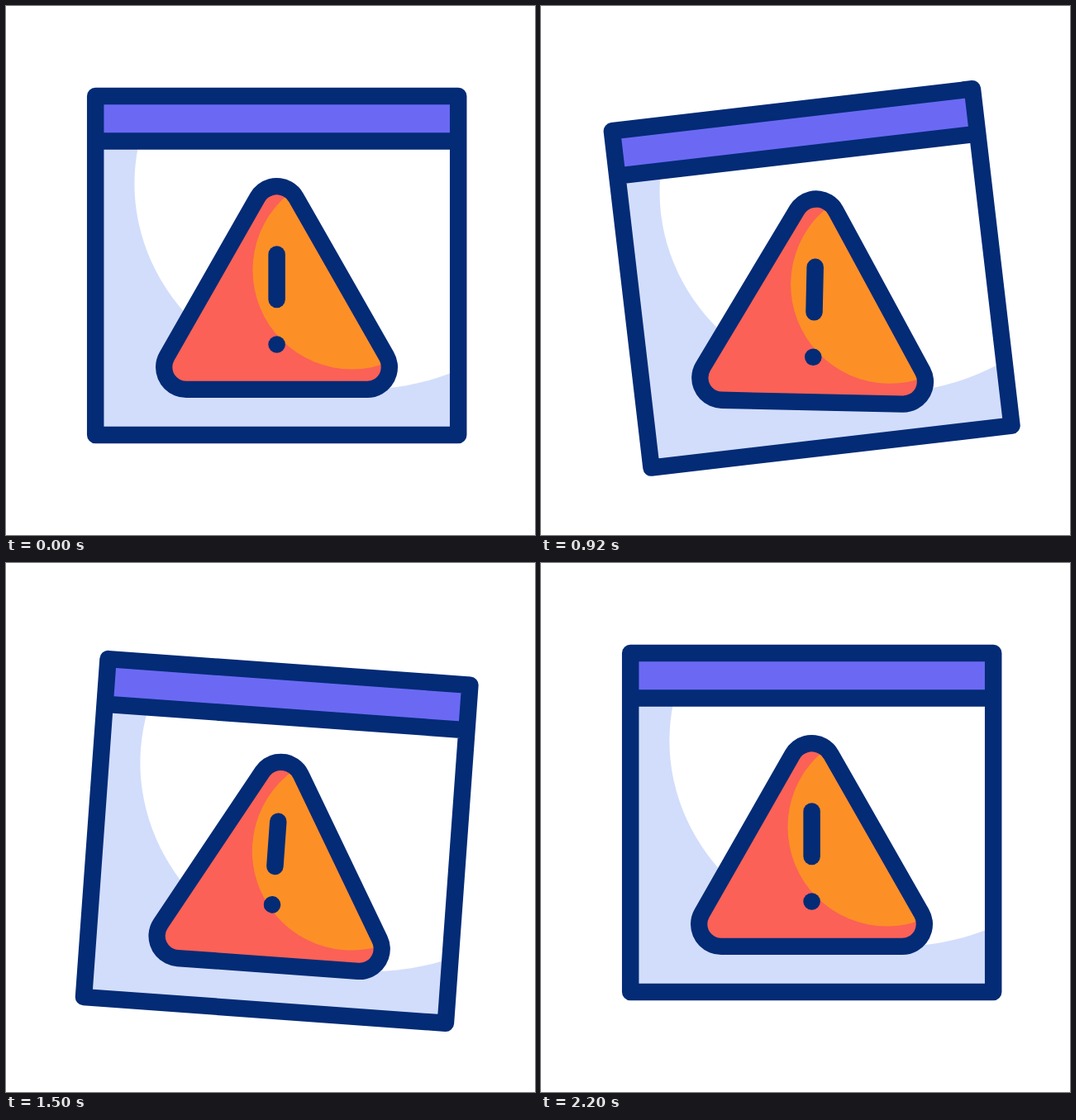
An HTML page that plays this animation: 640x640 px, repeating every 2.4 s.

```html
<!DOCTYPE html>
<html lang="en">
<head>
<meta charset="utf-8">
<title>Warning window</title>
<style>
html, body { margin: 0; height: 100%; overflow: hidden; background: #fff; }
svg { display: block; width: 100vw; height: 100vh; }
</style>
</head>
<body>
<svg viewBox="0 0 640 640">
  <defs>
    <clipPath id="pane"><path d="M108 109H547V519H108Z"/></clipPath>
    <path id="tri" d="M218 437L327.5 245L437 437Z" stroke-linejoin="round"/>
    <mask id="inside"><use href="#tri" fill="#fff" stroke="#fff" stroke-width="33.4"/></mask>
  </defs>
  <g id="win">
    <g clip-path="url(#pane)">
      <path d="M108 109H547V519H108Z" fill="#d2ddfb"/>
      <ellipse cx="430.4" cy="215" rx="275" ry="249" fill="#fff"/>
      <path d="M108 109H547V163H108Z" fill="#6b69f4"/>
    </g>
    <path d="M108.2 108.9H547.2V519H108.2ZM108.2 163.6H547.2" fill="none" stroke="#032b76"
      stroke-width="20.5" stroke-linejoin="round" stroke-linecap="round"/>
    <g id="sign">
      <use href="#tri" fill="#032b76" stroke="#032b76" stroke-width="74"/>
      <use href="#tri" fill="#fb6157" stroke="#fb6157" stroke-width="33.4"/>
      <circle cx="418.5" cy="319.5" r="120" fill="#fc9027" mask="url(#inside)"/>
      <line id="bar" x1="327.6" x2="327.6" stroke="#032b76" stroke-width="20.5" stroke-linecap="round"/>
      <circle id="dot" cx="327.6" r="10.3" fill="#032b76"/>
    </g>
  </g>
</svg>
<script>
const [win, sign, bar, dot] = ['win', 'sign', 'bar', 'dot'].map(id => document.getElementById(id));

function ease(t, from, to) {
  const s = Math.min(1, Math.max(0, (t - from) / (to - from)));
  return s * s * (3 - 2 * s);
}

// Rises to 1 at the peak, then falls back to 0.
const pulse = (t, from, peak, to) => ease(t, from, peak) - ease(t, peak, to);

function draw(now) {
  const t = now % 2400;
  const drop = 25.5 * pulse(t, 400, 1310, 2200);
  const tilt = 5 * pulse(t, 1000, 1600, 2200) - 7 * pulse(t, 400, 1000, 1600);

  // The sign shakes left, right, left.
  const beat = 255;
  let shake = 0;
  for (let i = 0; i < 3; i++) {
    const start = 400 + i * beat;
    shake += (i % 2 ? 8 : -8) * pulse(t, start, start + beat, start + 2 * beat);
  }

  // The exclamation mark hops, stretches in the air and settles.
  const hop = ease(t, 1300, 1500) - ease(t, 1800, 2200);
  const stretch = pulse(t, 1500, 1800, 2200);
  const top = 300.5 - 10.4 * hop;

  win.setAttribute('transform', `translate(0 ${drop}) rotate(${tilt} 327.7 313.9)`);
  sign.setAttribute('transform', `rotate(${shake} 327.6 341.5)`);
  bar.setAttribute('y1', top);
  bar.setAttribute('y2', top + 54.5 + 12.5 * stretch);
  dot.setAttribute('cy', 409.5 - 18.4 * hop - 5 * stretch);
  requestAnimationFrame(draw);
}
draw(0);
</script>
</body>
</html>
```
